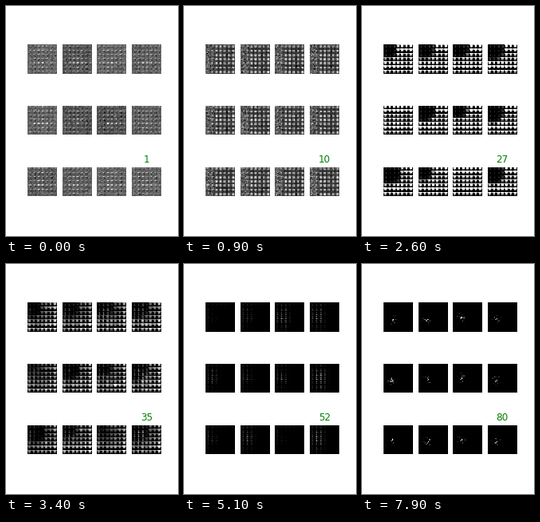
Recreate the animation shown at these times as a matplotlib script. Size 216x288 px, loop 8000 ms.

```python
import numpy as np
import matplotlib.pyplot as plt
from matplotlib.animation import FuncAnimation

ROWS, COLS, FRAMES = 3, 4, 80
PANELS = ROWS * COLS
CELL, CELLS = 4, 7
N = CELL * CELLS
KEYS = [0, 9, 16, 26, 42, 60, 79]
STRENGTH = [.25, .6, 1, 1, .7, .55, .7, 1.2, .5, .8, .25, 1]

gy, gx = np.mgrid[0:N, 0:N]
u, v = gx % CELL, gy % CELL                      # place inside a cell
cx, cy = (gx + .5) / CELL, (gy + .5) / CELL      # place on the cell grid
col, row = gx // CELL + .5, gy // CELL + .5      # middle of each cell


def spot(x, y, w, h, slant=0):
    """One soft dot, repeated in every cell."""
    return np.exp(-((u - x + slant * (v - y)) / w) ** 2 - ((v - y) / h) ** 2)


def patch(x, y, w, h):
    """One soft bump over the whole picture."""
    return np.exp(-((cx - x) / w) ** 2 / 2 - ((cy - y) / h) ** 2 / 2)


def per_cell(rng):
    return np.kron(rng.normal(0, 1, (CELLS, CELLS)), np.ones((CELL, CELL)))


STROKE = spot(2, 1, 1, .7, .7)
PIT = spot(3, 2.5, .8, .8)
BLOB = spot(1.8, 1.6, 1.1, 1.1)
DOT = spot(2, 1.6, .6, .8)
DASH = spot(2, 3, .9, .5) + .4 * spot(1.6, 1, .8, .6)
CUP = np.clip(2.2 - abs(u - 1.4) - .6 * v, 0, 1)


def stages(p):
    rng = np.random.default_rng(40 + p)
    noise = rng.normal(0, 1, (N, N))
    cells = per_cell(rng)
    s = STRENGTH[p]

    # grey weave
    inner = np.clip(np.minimum(np.minimum(cx, 7 - cx), np.minimum(cy, 7 - cy)), 0, 1)
    weave = inner * ((.38 + .1 * cells) * STROKE - .16 * PIT) + .05 * noise
    first = .34 + rng.uniform(-.03, .06) + weave

    # bright blobs, still grey at the left and top
    edge = np.clip((cx - .8) / 2, 0, 1) * np.clip(.4 + cy / 2, 0, 1)
    second = edge * (.16 + .74 * BLOB) + (1 - edge) * (.36 + weave) + .05 * noise

    # dotted core in a dim rim
    core = patch(3 + rng.uniform(-.4, .4), 3.6, 1.4, 2.2)
    rim = 1 - patch(4, 3.8, 1.8, 2.1)
    third = core * DOT + rim * (.1 + .5 * STROKE + .25 * DASH + .09 * noise)

    # cups around a dark corner; two panels stay fully lit
    x, y = rng.uniform(1, 2.2, 2)
    radius = (1.8 + rng.uniform(0, 1.2)) * (p % 6 != 4)
    dist = np.hypot(np.maximum(col - x, 0), np.maximum(row - y, 0))
    lit = 1 / (1 + np.exp(-6 * (dist - radius))) if radius else 1
    dim = .1 + .35 * np.exp(-np.minimum(cx, cy))
    fourth = lit * CUP + (1 - lit) * dim * DOT

    # fading glow at the left
    glow = patch(.3 + 1.5 * s, 2 + 1.3 * s, .4 + .7 * s, 2) * s * (1 + .3 * cells)
    fifth = np.clip(glow, 0, 1.3) * (.6 * DASH + .6 * DOT)
    fifth += .15 * DOT * np.exp(-np.minimum(cx, cy) * 1.5) * (cx < 5)

    # a few dashes, then scattered points
    sixth = s * patch(1.8, 3.7 + rng.uniform(-.4, .3), .7, .6) * DASH
    sixth += .08 * (1.3 - s) * DOT * np.exp(-np.minimum(cx, cy)) * (cx < 5)

    px, py = rng.integers(8, 10), rng.integers(14, 17)
    sparse = np.clip(rng.normal(-1.1, 1, (N, N)), 0, .7)
    last = patch(px / CELL, py / CELL, .6, .6) * sparse
    last[py, px] = 1
    last[py + 1, px - 1] = .5
    last[py + 3, px + 1] = .3
    return [first, second, third, fourth, fifth, sixth, last], dist


SCENES = [stages(p) for p in range(PANELS)]


def picture(p, i):
    keys, dist = SCENES[p]
    k = min(np.searchsorted(KEYS, i, side="right") - 1, len(KEYS) - 2)
    t = (i - KEYS[k]) / (KEYS[k + 1] - KEYS[k])
    flicker = .4 * t * (1 - t)
    if KEYS[k] == 26:      # darkness spreads outward
        t = np.clip(1.8 * t - .8 * np.clip(dist / 7, 0, 1), 0, 1)
    img = (1 - t) * keys[k] + t * keys[k + 1]
    img = img * (1 + flicker * per_cell(np.random.default_rng(1000 + i * PANELS + p)))
    if i > 44:
        img = img * (gx < 20)
    return np.clip(img, 0, 1)


fig, axes = plt.subplots(ROWS, COLS, figsize=(3, 4), dpi=72, facecolor="white")
fig.subplots_adjust(left=.125, right=.9, bottom=.125, top=.88, wspace=.2, hspace=.2)
images = []
for p, ax in enumerate(axes.flat):
    ax.axis("off")
    images.append(ax.imshow(picture(p, 0), cmap="gray", vmin=0, vmax=1,
                            interpolation="nearest"))
title = axes[-1, -1].set_title("1", color="green", fontsize=12,
                               fontfamily="DejaVu Sans")


def update(i):
    for p, im in enumerate(images):
        im.set_data(picture(p, i))
    title.set_text(str(i + 1))
    return [*images, title]


anim = FuncAnimation(fig, update, frames=FRAMES, interval=100,
                     repeat=True, repeat_delay=0, blit=False)
plt.show()
```
